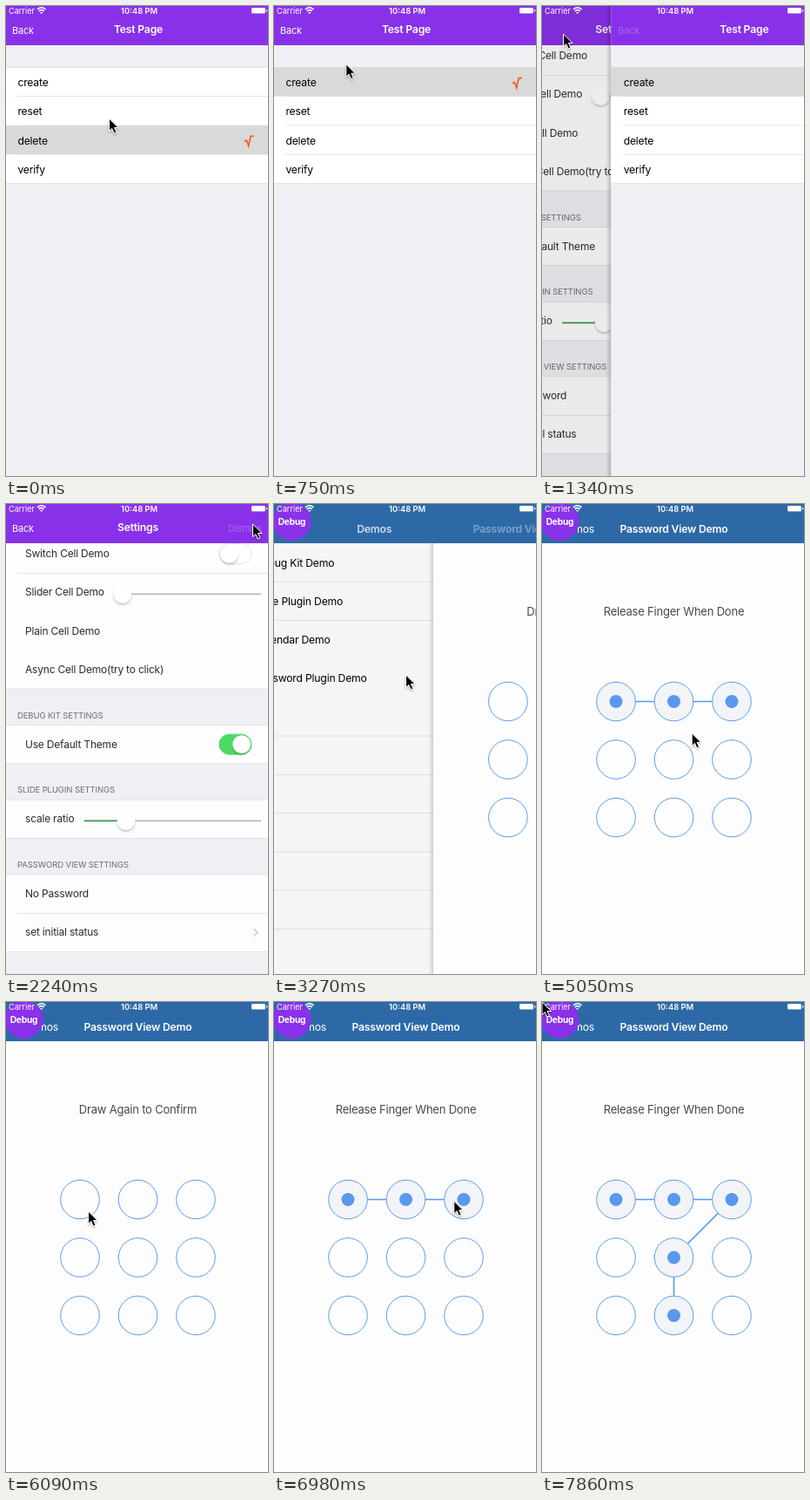
Write an HTML page that moves like this. It is 301 px wide and 539 px high and loops after 8 s.

```html
<!DOCTYPE html>
<html lang="en">
<head>
<meta charset="utf-8">
<title>Settings and pattern lock</title>
<style>
  html, body { margin: 0; width: 100%; height: 100%; overflow: hidden; background: #fff; }
  svg { display: block; width: 301px; height: 539px; }
  text { font-family: Inter, "Open Sans", sans-serif; font-size: 12.2px; letter-spacing: -.2px; }
  .set { font-size: 12px; fill: #2b2b2b; }
  .head { font-size: 9.5px; letter-spacing: -.1px; fill: #6d6d72; }
  .title { font-size: 12.2px; font-weight: 600; fill: #fff; text-anchor: middle; }
  .bar { font-size: 11px; fill: #fff; }
  .stat { font-size: 9.2px; letter-spacing: 0; fill: #fff; }
  .clock { font-size: 9.3px; font-weight: 600; text-anchor: middle; }
  .debug { font-size: 10.2px; font-weight: 700; fill: #fff; text-anchor: middle; }
  .prompt { font-size: 13px; fill: #484848; text-anchor: middle; }
</style>
</head>
<body>
<svg viewBox="0 0 301 539">
  <defs>
    <linearGradient id="edge">
      <stop offset="0" stop-opacity="0"/><stop offset="1" stop-opacity=".2"/>
    </linearGradient>
    <filter id="soft" x="-40%" y="-40%" width="180%" height="190%">
      <feDropShadow dx="0" dy="1.6" stdDeviation="1.3" flood-opacity=".28"/>
    </filter>
  </defs>

  <g id="demos">
    <g id="list"></g>
    <rect id="listDim" width="301" height="539"/>
    <g id="lock">
      <rect x="-6" width="6" height="539" fill="url(#edge)"/>
      <rect x="-1" width="302" height="539" fill="#fdfdfd"/>
      <text id="prompt" class="prompt" x="151.5" y="128"></text>
      <g id="lines" stroke="#5898ee" stroke-width="1.6"></g>
      <g id="dots"></g>
    </g>
    <rect width="301" height="45" fill="#2e69a7"/>
    <text id="demosTitle" class="title" y="33">Demos</text>
    <text id="demosBack" x="60" y="33" fill="#fff" text-anchor="end">Demos</text>
    <text id="lockTitle" class="title" y="33">Password View Demo</text>
    <g id="debug">
      <circle cx="20.5" cy="20" r="22" fill="#8a31ea"/>
      <text class="debug" x="20.5" y="23.5">Debug</text>
    </g>
  </g>

  <g id="settings">
    <g id="form"></g>
    <rect id="formDim" width="301" height="539"/>
  </g>

  <g id="test">
    <rect x="-7" width="6" height="539" fill="url(#edge)"/>
    <rect x="-1" width="302" height="539" fill="#efeff4"/>
    <rect x="-1" width="302" height="45" fill="#8931e9"/>
    <text id="testBack" class="bar" x="7" y="32">Back</text>
    <text class="title" x="152" y="31">Test Page</text>
    <g id="rows"></g>
    <path id="check" d="M274 155.5l2.3-1.5 2.4 6.6 2.4-11.4h3.8" fill="none" stroke="#f25c16" stroke-width="1.6"/>
  </g>

  <g id="status">
    <text class="stat" x="3" y="8.5">Carrier</text>
    <g fill="none" stroke="#fff" stroke-width="1.5">
      <path d="M36 3.8q4.8-4 9.6 0M37.8 5.9q3-2.5 6 0"/>
      <path d="M39.4 7.4h2.8l-1.4 1.3z" fill="#fff" stroke-width=".6"/>
    </g>
    <text class="stat clock" x="153" y="8.5">10:48 PM</text>
    <rect x="282" y="2" width="16" height="6.5" rx="1.6" fill="#fff"/>
    <rect x="299" y="4" width="1.2" height="2.6" rx=".6" fill="#fff"/>
  </g>

  <path id="cursor" d="M0 0v14.6l3.3-3.1 2.4 5.5 2.7-1.2-2.4-5.3h4.5z"
        fill="#000" stroke="#fff" stroke-width="1" filter="url(#soft)"/>
</svg>
<script>
const W = 301, H = 539, CELL = 44.25, PURPLE = '#8931e9';
const $ = id => document.getElementById(id);
const put = (id, markup) => { $(id).innerHTML = markup; };
const times = (n, f) => Array.from({ length: n }, (_, i) => f(i));
const rect = (x, y, w, h, fill, more = '') =>
  `<rect x="${x}" y="${y}" width="${w}" height="${h}" fill="${fill}" ${more}/>`;
const label = (x, y, s, cls = '') => `<text x="${x}" y="${y}" class="${cls}">${s}</text>`;
const rule = (y, x = 13, id = '') => rect(x, y, W - x, .7, '#dcdce0', id && `id="${id}"`);

// Demo list
const demos = ['Debug Kit Demo', 'Slide Plugin Demo', 'Calendar Demo', 'Password Plugin Demo'];
put('list', rect(0, 0, W, H, '#fff') +
  demos.map((s, i) => label(13, 71.5 + i * CELL, s)).join('') +
  times(10, i => rule(88.7 + i * CELL, 13, 'sep' + i)).join(''));

// Settings form: each row is a label and an optional control drawn at the row's middle
const knob = (x, y) => `<circle cx="${x}" cy="${y}" r="10.4" fill="#fff" filter="url(#soft)"/>`;
const slider = (from, x) => y => rect(from, y + 1.2, 293 - from, 1.6, '#b4b4b6') +
  rect(from, y + 1.2, x - from, 1.6, '#37a04a') + knob(x, y + 2);
const toggle = on => y =>
  rect(245, y - 11.5, 37, 23, on ? '#4cd964' : '#fff', `rx="11.5" stroke="${on ? '#4cd964' : '#e4e4e6'}"`) +
  knob(on ? 270.8 : 256.4, y);
const chevron = y =>
  `<path d="M284.5 ${y - 4.3}l4.3 4.3-4.3 4.3" fill="none" stroke="#c7c7cc" stroke-width="1.4"/>`;
const sections = [
  ['', ['Switch Cell Demo', toggle(false)], ['Slider Cell Demo', slider(134, 134)],
    ['Plain Cell Demo'], ['Async Cell Demo(try to click)']],
  ['DEBUG KIT SETTINGS', ['Use Default Theme', toggle(true)]],
  ['SLIDE PLUGIN SETTINGS', ['scale ratio', slider(90, 138)]],
  ['PASSWORD VIEW SETTINGS', ['No Password'], ['set initial status', chevron]],
];
function buildForm() {
  let y = 35, out = rect(0, 0, W, H, '#efeff4');
  for (const [head, ...rows] of sections) {
    const h = rows.length * CELL;
    out += label(13, y - 8, head, 'head') + rect(0, y, W, h, '#fdfdfd') + rule(y - .4, 0) + rule(y + h - .4, 0);
    if (rows.length > 1) out += rule(y + CELL);
    rows.forEach(([s, control], i) => {
      const mid = y + (i + .5) * CELL;
      out += label(22, mid + 4.1, s, 'set') + (control ? control(mid) : '');
    });
    y += h + 41.5;
  }
  return out + rect(0, 0, W, 45, PURPLE) + label(7, 32, 'Back', 'bar') + label(151.5, 31, 'Settings', 'title') +
    '<text id="dismiss" class="bar" x="294" y="32" text-anchor="end">Dismiss</text>';
}
put('form', buildForm());

// Choice rows
const ROW = 33.3, TOP = 70.4;
const choices = ['create', 'reset', 'delete', 'verify'];
put('rows', choices.map((s, i) => rect(-1, TOP + i * ROW, W + 1, ROW, '#fff', `id="row${i}"`)).join('') +
  choices.map((s, i) => label(13.4, TOP + i * ROW + 21.6, s) + rule(TOP + i * ROW - .4, i ? 13 : 0)).join('') +
  rule(TOP + 4 * ROW - .4, 0));

// Pattern lock
const spot = i => [85 + i % 3 * 66.5, 226.5 + Math.floor(i / 3) * 66.5];
const pattern = [0, 1, 2, 4, 7];
const reach = pattern.reduce((sum, k, i) => {
  const [x, y] = spot(k), [px, py] = spot(pattern[Math.max(i - 1, 0)]);
  return [...sum, (sum[i - 1] || 0) + Math.hypot(x - px, y - py)];
}, []);
const total = reach[reach.length - 1];
put('lines', pattern.slice(1).map((b, i) => {
  const [x1, y1] = spot(pattern[i]), [x2, y2] = spot(b);
  return `<line id="line${i + 1}" x1="${x1}" y1="${y1}" x2="${x2}" y2="${y2}"/>`;
}).join(''));
put('dots', times(9, i => {
  const at = 'cx="' + spot(i).join('" cy="') + '"';
  return `<circle id="ring${i}" ${at} r="22.3" stroke="#5c9cef"/><circle id="dot${i}" ${at} r="7.5" fill="#5898ee"/>`;
}).join(''));

// Time runs in ticks; the screen refreshes once per tick.
const TICK = 148.3, LOOP = 8000;
const strokes = [{ start: 28, span: 9, end: 38 }, { start: 43, span: 8, end: 54 }];
const stop = (x, y, from, to = from) => ({ x, y, from, to });
const trace = ({ start, span }) => pattern.map((k, i) => {
  const [x, y] = spot(k);
  return stop(x - 1.5, y - 8, start + span * reach[i] / total);
});
const path = [
  stop(118.5, 129, 0), stop(112, 84, 3, 4), stop(24.5, 32, 7, 9), stop(283.5, 23, 13, 16),
  stop(151.5, 196, 20, 23), stop(71.5, 218, 27), ...trace(strokes[0]),
  stop(94.5, 240, 41, 42), ...trace(strokes[1]),
];
function hand(n) {
  const next = path.findIndex(p => p.from > n);
  const a = path[(next < 0 ? path.length : next) - 1], b = path[next] || a;
  const f = n > a.to ? (n - a.to) / (b.from - a.to) : 0;
  return [a.x + (b.x - a.x) * f, a.y + (b.y - a.y) * f];
}
const ease = (n, start, span) => {
  const u = Math.min(1, Math.max(0, (n - start) / span));
  return u * u * (3 - 2 * u);
};
const move = (id, x, y = 0) => $(id).setAttribute('transform', `translate(${x} ${y})`);
const attr = (id, name, value) => $(id).setAttribute(name, value);
const show = (id, on) => attr(id, 'visibility', on ? 'visible' : 'hidden');
const fade = (id, value) => attr(id, 'opacity', value);

function draw(t) {
  const n = Math.floor(t / TICK);
  move('cursor', ...hand(n));

  // Choice page slides off the settings form, which then drops away
  const pop = ease(n, 8, 2.95), drop = ease(n, 15, 3), choice = n < 3 ? 2 : 0;
  choices.forEach((s, i) => attr('row' + i, 'fill', i === choice ? '#d9d9d9' : '#fff'));
  move('check', 0, (choice - 2) * ROW);
  move('test', W * pop);
  show('test', pop < 1);
  fade('testBack', n < 8 ? 1 : .25);
  move('settings', -91 * (1 - pop), H * drop);
  show('settings', drop < 1);
  fade('formDim', .1 * (1 - pop));
  fade('dismiss', n < 15 ? 1 : .25);

  // Lock page slides over the list
  const push = ease(n, 21, 2.35);
  move('list', -90 * push);
  fade('listDim', .1 * push);
  move('lock', W * (1 - push));
  show('lock', push > 0);
  show('sep2', n < 21);
  show('sep3', n < 21);
  show('debug', drop === 1);
  attr('demosTitle', 'x', 151 - 92 * push);
  fade('demosTitle', push < .9 ? 1 - push * .6 : 0);
  fade('demosBack', push < .9 ? 0 : 1);
  attr('lockTitle', 'x', 151.5 + 228 * (1 - push));
  fade('lockTitle', push);

  // A ring is picked once the finger comes within its radius
  const stroke = strokes.find(s => n >= s.start && n < s.end);
  const done = stroke ? total * (n - stroke.start) / stroke.span : -99;
  const picked = pattern.filter((k, i) => done >= reach[i] - 22);
  $('prompt').textContent = stroke ? 'Release Finger When Done'
    : n < strokes[0].start ? 'Draw A Pattern' : 'Draw Again to Confirm';
  times(9, i => {
    const on = picked.includes(i);
    attr('ring' + i, 'fill', on ? '#f2f4f7' : '#fdfdfd');
    fade('dot' + i, on ? 1 : 0);
  });
  for (let i = 1; i < pattern.length; i++) fade('line' + i, i < picked.length ? 1 : 0);
}

const start = performance.now();
function frame() {
  draw((performance.now() - start) % LOOP);
  requestAnimationFrame(frame);
}
frame();
</script>
</body>
</html>
```
